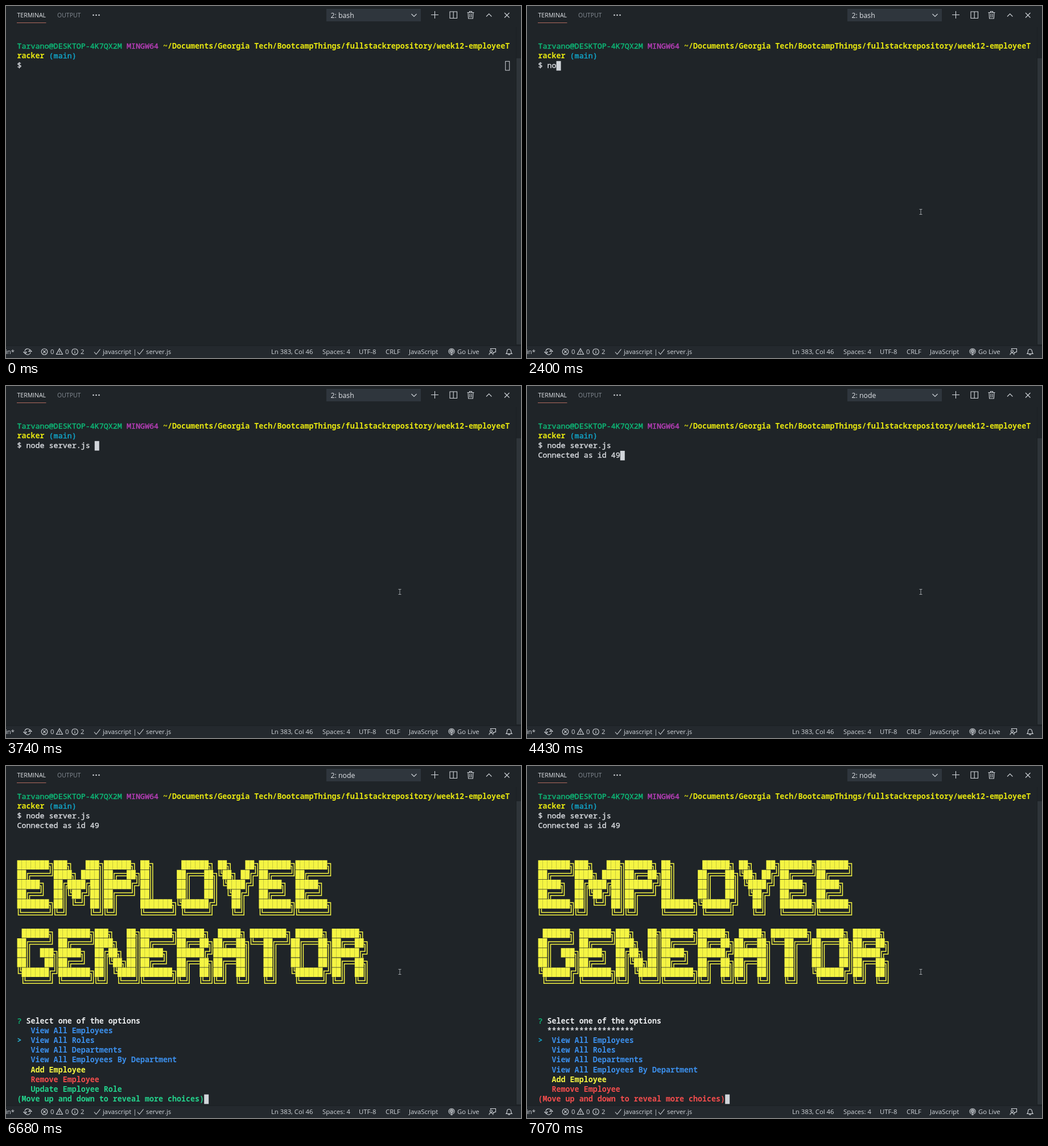
An HTML page for the animation above (8000 ms loop, 905 by 619 pixels).

```html
<!DOCTYPE html>
<html lang="en">
<head>
<meta charset="utf-8">
<title>Terminal session</title>
<style>
  html, body { margin: 0; width: 100%; height: 100%; overflow: hidden; background: #1f2428; }
  svg { display: block; }
  text { white-space: pre; }
  .ui { font-family: "Open Sans", "Noto Sans", sans-serif; font-size: 11.3px; fill: #d1d5da; }
  .mono { font-family: "Noto Sans Mono", "DejaVu Sans Mono", monospace; font-size: 13.36px; }
  .icon { fill: none; stroke: #d1d5da; stroke-width: 1.1; }
</style>
</head>
<body>
<svg id="stage" width="905" height="619" viewBox="0 0 905 619">
  <rect width="905" height="619" fill="#1f2428"/>
  <path d="M896.5 37V597" stroke="#1b1f23"/>
  <rect id="slider" x="897" width="8" fill="#2e3439"/>

  <g class="ui">
    <text x="19.5" y="20" style="font-size:10.5px;fill:#e1e4e8">TERMINAL</text>
    <text x="90" y="20" style="font-size:10.5px;fill:#868d95">OUTPUT</text>
    <path d="M19 29.5H70.5" stroke="#b06a5e"/>
    <g fill="#d1d5da">
      <circle cx="153.5" cy="16" r="1.3"/><circle cx="158.5" cy="16" r="1.3"/><circle cx="163.5" cy="16" r="1.3"/>
    </g>
    <rect x="563" y="5" width="166" height="22" fill="#2f363d"/>
    <text id="shell" x="570.5" y="20.7" style="font-size:12.3px;fill:#e1e4e8"></text>
  </g>
  <g class="icon">
    <path d="M712.5 14l4.5 4.5 4.5-4.5"/>
    <path d="M747 15.5h13M753.5 9v13"/>
    <path d="M780 10h12.5v11.5H780zM786.2 10v11.5"/>
    <path d="M810.5 11.5h12M814.5 11.5v-2h4v2M812 11.5l.6 10.5h7.8l.6-10.5M815 13.5v6.5M818 13.5v6.5"/>
    <path d="M844 18.5l4.7-4.7 4.7 4.7"/>
    <path d="M876 12l8.5 8.5M884.5 12l-8.5 8.5"/>
  </g>

  <g id="terminal" class="mono"></g>

  <rect y="597" width="905" height="22" fill="#24292e"/>
  <path d="M0 597.5H905" stroke="#1b1f23"/>
  <g id="status" class="ui"></g>
  <g class="icon">
    <path d="M33 607a5 5 0 0 1 9.3-1.6M43 609a5 5 0 0 1-9.3 1.6M40 607.5h5l-2.5-3zM31 608.5h5l-2.5 3z"/>
    <circle cx="67.5" cy="608" r="5.3"/><path d="M65.2 605.7l4.6 4.6M69.8 605.7l-4.6 4.6"/>
    <path d="M94 602.5l5.5 10h-11zM94 606v3.5M94 610.5v1"/>
    <circle cx="121" cy="608" r="5.3"/><path d="M121 607v4M121 604.6v1.2"/>
    <path d="M155 608.5l3.5 4 7-9M231 608.5l3.5 4 7-9"/>
    <circle cx="783" cy="607" r="1.3"/>
    <path d="M780.3 611.7a5 5 0 1 1 5.4 0M781 609.4a2.9 2.9 0 1 1 4 0M782 609.5h2v4h-2z"/>
    <path d="M851.5 604v-1.5h9v6h-2l-2 2v-2"/>
    <circle cx="852.5" cy="607" r="2"/><path d="M849 613.5a3.5 3.5 0 0 1 7 0"/>
    <path d="M879 611.5c1.5-1.5 1.5-3 1.5-4.5a3.5 3.5 0 0 1 7 0c0 1.5 0 3 1.5 4.5zM882.5 612a1.5 1.5 0 0 0 3 0"/>
  </g>

  <path id="arrow" d="M0 0v12l2.8-2.6 1.9 4.2 1.8-.8-1.9-4.1h3.9z" fill="#fff" stroke="#000" stroke-width=".6"/>
  <path id="beam" d="M-2.5-4.5h5M0-4.5v9M-2.5 4.5h5" fill="none" stroke="#a0a4a8"/>
</svg>
<script>
const LOOP = 8000, COL = 8.016, ROW = 17.17, LEFT = 19.5, TOP = 45.1;
const C = {
  fg: '#d9dce0', white: '#e8eaec', green: '#0dbc79', lime: '#23d18b', magenta: '#bc3fbc',
  olive: '#e5e510', yellow: '#f5f543', cyan: '#11a8cd', aqua: '#29b8db', blue: '#3b8eea', red: '#f14c4c'
};
const $ = id => document.getElementById(id);
const colX = col => LEFT + col * COL;
const rowY = row => TOP + row * ROW;

function add(parent, tag, attrs = {}, content = '') {
  const el = document.createElementNS('http://www.w3.org/2000/svg', tag);
  for (const key in attrs) el.setAttribute(key, attrs[key]);
  el.textContent = content;
  return parent.appendChild(el);
}
// Regular text gets a hairline outline for a medium weight
const put = (parent, col, row, str, fill, bold) => add(parent, 'text', {
  x: colX(col), y: rowY(row) + 12.7, fill, 'font-weight': bold ? 700 : 400,
  stroke: fill, 'stroke-width': bold ? 0 : .4
}, str);
const show = (el, on) => el.setAttribute('visibility', on ? 'visible' : 'hidden');

const terminal = $('terminal');

// Shell output; shifts up one row when the menu opens
const session = add(terminal, 'g');
put(session, 0, 0, 'Tarvano@DESKTOP-4K7QX2M', C.green);
put(session, 24, 0, 'MINGW64', C.magenta);
put(session, 32, 0, '~/Documents/Georgia Tech/BootcampThings/fullstackrepository/week12-employeeT', C.olive, true);
put(session, 0, 1, 'racker', C.olive, true);
put(session, 7, 1, '(main)', C.cyan);
put(session, 0, 2, '$', C.fg);
const command = put(session, 2, 2, '', C.fg);
const connected = put(session, 0, 3, 'Connected as id 49', C.fg);

// Block lettering
const GLYPHS = {
  E: ['███████╗', '██╔════╝', '█████╗  ', '██╔══╝  ', '███████╗', '╚══════╝'],
  M: ['███╗   ███╗', '████╗ ████║', '██╔████╔██║', '██║╚██╔╝██║', '██║ ╚═╝ ██║', '╚═╝     ╚═╝'],
  P: ['██████╗ ', '██╔══██╗', '██████╔╝', '██╔═══╝ ', '██║     ', '╚═╝     '],
  L: ['██╗     ', '██║     ', '██║     ', '██║     ', '███████╗', '╚══════╝'],
  O: [' ██████╗ ', '██╔═══██╗', '██║   ██║', '██║   ██║', '╚██████╔╝', ' ╚═════╝ '],
  Y: ['██╗   ██╗', '╚██╗ ██╔╝', ' ╚████╔╝ ', '  ╚██╔╝  ', '   ██║   ', '   ╚═╝   '],
  G: [' ██████╗ ', '██╔════╝ ', '██║  ███╗', '██║   ██║', '╚██████╔╝', ' ╚═════╝ '],
  N: ['███╗   ██╗', '████╗  ██║', '██╔██╗ ██║', '██║╚██╗██║', '██║ ╚████║', '╚═╝  ╚═══╝'],
  R: ['██████╗ ', '██╔══██╗', '██████╔╝', '██╔══██╗', '██║  ██║', '╚═╝  ╚═╝'],
  A: [' █████╗ ', '██╔══██╗', '███████║', '██╔══██║', '██║  ██║', '╚═╝  ╚═╝'],
  T: ['████████╗', '╚══██╔══╝', '   ██║   ', '   ██║   ', '   ██║   ', '   ╚═╝   ']
};
const CORNERS = { '╔': [1, 1], '╗': [-1, 1], '╚': [1, -1], '╝': [-1, -1] };

function doubleLine(ch, x, y) {
  const cx = x + COL / 2, cy = y + ROW / 2, gapX = 1.9, gapY = 2.3;
  return [1, -1].map(side => {
    if (ch === '═') return `M${x} ${cy + side * gapY}h${COL}`;
    if (ch === '║') return `M${cx + side * gapX} ${y}v${ROW}`;
    const [dx, dy] = CORNERS[ch];
    return `M${cx - side * dx * gapX} ${cy + dy * ROW / 2}V${cy - side * dy * gapY}H${cx + dx * COL / 2}`;
  }).join('');
}

const banner = add(terminal, 'g');
function drawWord(word, top) {
  let blocks = '', lines = '';
  for (let r = 0; r < 6; r++) {
    const str = [...word].map(letter => GLYPHS[letter][r]).join('');
    [...str].forEach((ch, col) => {
      const x = colX(col), y = rowY(top + r);
      if (ch === '█') blocks += `M${x + .1} ${y + .4}h${COL - .2}v${ROW - .8}h${.2 - COL}z`;
      else if (ch !== ' ') lines += doubleLine(ch, x, y);
    });
  }
  add(banner, 'path', { d: blocks, fill: C.yellow });
  add(banner, 'path', { d: lines, fill: 'none', stroke: C.yellow, 'stroke-width': 1.5 });
}
drawWord('EMPLOYEE', 7);
drawWord('GENERATOR', 14);

// Menu in its three states
const CHOICES = [
  ['View All Employees', C.blue], ['View All Roles', C.blue], ['View All Departments', C.blue],
  ['View All Employees By Department', C.blue], ['Add Employee', C.yellow],
  ['Remove Employee', C.red], ['Update Employee Role', C.lime]
];
function drawMenu({ pointer, pointerFill, hint, wrapped }) {
  const g = add(terminal, 'g');
  put(g, 0, 23, '?', hint ? C.lime : C.green, hint);
  put(g, 2, 23, 'Select one of the options', C.white, true);
  if (hint) put(g, 28, 23, '(Use arrow keys)', C.fg);
  if (wrapped) put(g, 2, 24, '*'.repeat(19), C.fg, true);
  const first = wrapped ? 25 : 24;
  const visible = CHOICES.slice(0, 31 - first);
  visible.forEach(([label, fill], i) => put(g, 3, first + i, label, fill, true));
  put(g, 0, 24 + pointer, '>', pointerFill, true);
  put(g, 0, 31, '(Move up and down to reveal more choices)', visible.at(-1)[1], true);
  return g;
}
const menus = [
  { at: 4510, g: drawMenu({ pointer: 0, pointerFill: C.cyan, hint: true }) },
  { at: 6680, g: drawMenu({ pointer: 1, pointerFill: C.aqua }) },
  { at: 7000, g: drawMenu({ pointer: 1, pointerFill: C.cyan, wrapped: true }) }
];

const caret = add(terminal, 'rect', { stroke: '#d1d5da' });

// Status bar
[[78, '0'], [104, '0'], [131, '2'], [170, 'javascript |'], [246, 'server.js'], [466, 'Ln 383, Col 46'],
 [556, 'Spaces: 4'], [620, 'UTF-8'], [667, 'CRLF'], [708, 'JavaScript'], [793, 'Go Live']
].forEach(([x, str]) => add($('status'), 'text', { x, y: 612 }, str));
add($('status'), 'text', { x: 15, y: 612, 'text-anchor': 'end' }, 'main*');

// Timed steps: [start, ...values]
const TYPING = [[0, ''], [2170, 'n'], [2400, 'no'], [2550, 'nod'], [2720, 'node'], [3270, 'node '],
  [3340, 'node s'], [3420, 'node se'], [3570, 'node ser'], [3740, 'node server.js ']];
const MOUSE = [[0], [70, 886, 604], [150, 880, 487], [1380, 804, 417], [1460, 726, 381], [1540, 696, 365], [1620, 692, 362]];
const CARET = [[0, 107, 3], [2170, null, 3], [4040, 107, 31], [4430, 18, 4], [4510, 107, 31],
  [6680, 41, 31], [7000, 107, 31], [7070, 41, 31]];
const at = (steps, t) => steps.findLast(step => step[0] <= t);

function render(t) {
  const inMenu = t >= 4510;
  const typed = at(TYPING, t)[1];
  session.setAttribute('transform', `translate(0 ${inMenu ? 0 : ROW})`);
  command.textContent = typed;
  show(connected, t >= 4430);
  show(banner, inMenu);
  menus.forEach(({ at: start, g }, i) => show(g, t >= start && t < (menus[i + 1]?.at ?? LOOP)));

  const [, col, row] = at(CARET, t), focused = t >= 1620, inset = focused ? 0 : .5;
  caret.setAttribute('x', colX(col ?? 2 + typed.length) + inset);
  caret.setAttribute('y', rowY(row) + .2 + inset);
  caret.setAttribute('width', COL - 2 * inset);
  caret.setAttribute('height', ROW - .4 - 2 * inset);
  caret.setAttribute('fill', focused ? '#d1d5da' : 'none');
  caret.setAttribute('stroke-width', focused ? 0 : 1);

  $('shell').textContent = t >= 4120 ? '2: node' : '2: bash';
  const sliderTop = inMenu ? 62 : 92;
  $('slider').setAttribute('y', sliderTop);
  $('slider').setAttribute('height', 595 - sliderTop);

  const [, x, y] = at(MOUSE, t), overStatus = y > 597;
  show($('arrow'), overStatus);
  show($('beam'), x && !overStatus);
  if (x) $(overStatus ? 'arrow' : 'beam').setAttribute('transform', `translate(${x} ${y})`);
}

const start = performance.now();
function tick() {
  render((performance.now() - start) % LOOP);
  requestAnimationFrame(tick);
}
render(0);
requestAnimationFrame(tick);
</script>
</body>
</html>
```
